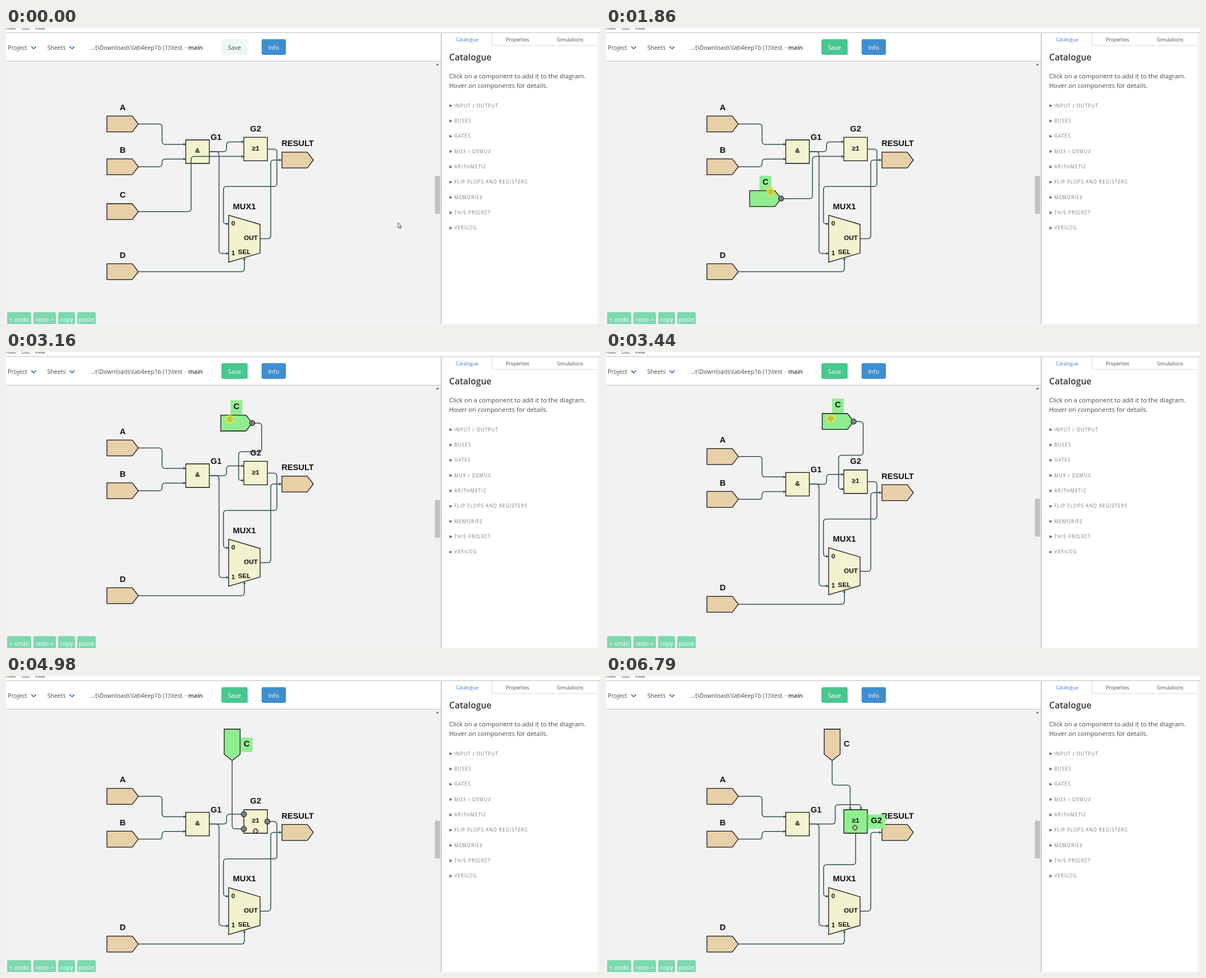
Recreate the animation shown at these times as an HTML page with a canvas. Size 1059 by 529 pixels, loop 8000 ms.

```html
<!DOCTYPE html>
<html lang="en">
<head>
<meta charset="utf-8">
<title>Schematic editor</title>
<style>
html, body { margin: 0; width: 100%; height: 100%; overflow: hidden; background: #fff; }
canvas { display: block; width: 1059px; height: 529px; }
</style>
</head>
<body>
<canvas id="stage" width="1059" height="529"></canvas>
<script>
const ctx = document.getElementById('stage').getContext('2d');
const LOOP = 8000;
const UI = '"Open Sans", "Noto Sans", sans-serif';
const DIAGRAM = '"Liberation Sans", Arial, sans-serif';
const TAN = '#e8d0a9', CREAM = '#f2f2cf', GREEN = '#90ee90';
const WIRE = '#2f4f4f', INK = '#111', GREY = '#4a4a4a';

// Moments of the user's actions
const GRAB = 1460, DROP = 3700, TURN_C = 4110, SELECT_G2 = 5190, TURN_G2 = 5660;
const LAG = 90, GATE = 42, PIN_W = 56, PIN_H = 28.4;

// Pointer moves: start, end, x, y, and the power of the ease-out
const MOVES = [
  [600, 800, 432, 388, 1],
  [1000, 1200, 370, 514, 1],
  [1200, GRAB, 195, 323, 2],
  [GRAB, 1860, 293, 293, 1],
  [1860, 2560, 384, 137, 2],
  [2650, 3350, 400.5, 119, 2],
  [3510, 3680, 390.5, 121, 2],
  [4450, 4960, 445, 277, 2],
  [5020, 5240, 444, 271, 2]
];

const progress = (t, a, b) => Math.min(1, Math.max(0, (t - a) / (b - a)));
const scrollAt = t => 43.6 * progress(t, 3300, DROP);

function pointerAt(t) {
  let x = 699, y = 348;
  for (const [a, b, tx, ty, power] of MOVES) {
    const k = 1 - (1 - progress(t, a, b)) ** power;
    x += (tx - x) * k;
    y += (ty - y) * k;
  }
  return [x, y];
}

// The dragged pin trails the pointer and stops at the top edge
function pinC(t) {
  const [x, y] = pointerAt(Math.min(3770, Math.max(GRAB, t - LAG)));
  return [x - 15, Math.max(109, y - 9)];
}

function rect(x, y, w, h, fill, r = 0) {
  ctx.fillStyle = fill;
  ctx.beginPath();
  ctx.roundRect(x, y, w, h, r);
  ctx.fill();
}

function text(s, x, y, size, color = GREY, align = 'left', weight = 400, family = UI) {
  ctx.font = `${weight} ${size}px ${family}`;
  ctx.fillStyle = color;
  ctx.textAlign = align;
  ctx.fillText(s, x, y);
}

function poly(pts, fill, stroke, width = 1.3) {
  ctx.beginPath();
  pts.forEach(p => ctx.lineTo(...p));
  ctx.closePath();
  ctx.fillStyle = fill;
  ctx.fill();
  if (!stroke) return;
  ctx.strokeStyle = stroke;
  ctx.lineWidth = width;
  ctx.stroke();
}

const bold = (s, x, y, size = 11.8, align = 'center') =>
  text(s, x, y + size * 0.36, size, INK, align, 700, DIAGRAM);

function label(s, x, y, selected) {
  const w = s.length * 10 + 11;
  if (selected) rect(x - w / 2, y - 10.5, w, 25.5, GREEN);
  bold(s, x, y, 14.7);
}

// A pin around its centre, pointing right or down
function pin(x, y, fill = TAN, down = false) {
  const w = PIN_W / 2, h = PIN_H / 2;
  ctx.save();
  ctx.translate(x, y);
  if (down) ctx.rotate(Math.PI / 2);
  poly([[-w, -h], [w - 11, -h], [w, 0], [w - 11, h], [-w, h]], fill, INK);
  ctx.restore();
}

function gate(s, x, y, fill = CREAM) {
  const r = GATE / 2;
  poly([[x - r, y - r], [x + r, y - r], [x + r, y + r], [x - r, y + r]], fill, INK);
  bold(s, x, y - 1.8);
}

function port([x, y]) {
  ctx.beginPath();
  ctx.arc(x, y, 4.7, 0, 7);
  ctx.fillStyle = '#7c7f7c';
  ctx.fill();
  ctx.strokeStyle = '#222';
  ctx.lineWidth = 1.2;
  ctx.stroke();
}

function wire(...pts) {
  const n = pts.length - 1;
  const gap = i => Math.hypot(pts[i + 1][0] - pts[i][0], pts[i + 1][1] - pts[i][1]);
  ctx.beginPath();
  ctx.moveTo(...pts[0]);
  for (let i = 1; i < n; i++)
    ctx.arcTo(...pts[i], ...pts[i + 1], Math.min(5, gap(i - 1) / 2, gap(i) / 2));
  ctx.lineTo(...pts[n]);
  ctx.strokeStyle = WIRE;
  ctx.lineWidth = 1.5;
  ctx.stroke();
  const [x, y] = pts[n], [px, py] = pts[n - 1];
  const dx = Math.sign(x - px) * 4, dy = Math.sign(y - py) * 4;
  poly([[x, y], [x - dx - dy * 0.6, y - dy + dx * 0.6], [x - dx + dy * 0.6, y - dy - dx * 0.6]], WIRE);
}

// From a right side to a left side; loops back when the end is behind the start
function link([x0, y0], [x1, y1]) {
  const mx = (x0 + x1) / 2, my = (y0 + y1) / 2, a = x0 + 17, b = x1 - 9.3;
  if (mx > x0 + 10) wire([x0, y0], [mx, y0], [mx, y1], [x1, y1]);
  else wire([x0, y0], [a, y0], [a, my], [b, my], [b, y1], [x1, y1]);
}

function diagram(t, s) {
  const [cx, cy] = pinC(t);
  const c = t < TURN_C ? [cx + PIN_W / 2, cy + PIN_H / 2] : [403.2, 123];
  const g1 = [341.5, 221 + s], g2 = [445, 216.4 + s], mux = [425, 376.6 + s];
  const cTurned = t >= TURN_C, gTurned = t >= TURN_G2;
  const gSelected = t >= SELECT_G2, cSelected = t >= GRAB && !gSelected;

  const off = ([x, y], dx, dy) => [x + dx, y + dy];
  const side = GATE / 2;
  const g1Out = off(g1, side, 0);
  const g2Out = gTurned ? off(g2, 0, side) : off(g2, side, 0);
  const g2Ins = gTurned ? [off(g2, 9.7, -side), off(g2, -9.7, -side)]
    : [off(g2, -side, -13), off(g2, -side, 13.2)];
  const mux0 = off(mux, -28, -26.5), mux1 = off(mux, -28, 26.3);
  const muxOut = off(mux, 28, 0), muxSel = off(mux, 0, 34);
  const cOut = cTurned ? off(c, 0, PIN_W / 2) : off(c, PIN_W / 2, 0);
  const tip = y => [236, y + s];

  for (const [name, x, y] of [['A', 208, 171.5], ['B', 208, 248], ['D', 208, 435.5], ['RESULT', 520, 236]]) {
    pin(x, y + s);
    label(name, x, y + s - 30);
  }
  gate('&', ...g1);
  label('G1', 374.5, g1[1] - 26.3);
  poly([off(mux, -28, -42), off(mux, 28, -25.5), off(mux, 28, 25.5), off(mux, -28, 42)], CREAM, INK);
  label('MUX1', ...off(mux, 0, -58));
  bold('0', ...off(mux, -20, -27.6));
  bold('1', ...off(mux, -20, 24.8));
  bold('OUT', ...off(mux, 24, -1.6), 11.8, 'right');
  bold('SEL', ...off(mux, 0, 23.4));

  const layers = [
    () => {
      gate('≥1', ...g2, gSelected ? GREEN : CREAM);
      label('G2', ...(gTurned ? off(g2, 37, -2) : off(g2, 0, -37)), gSelected);
    },
    () => {
      pin(...c, cSelected ? GREEN : TAN, cTurned);
      label('C', ...(cTurned ? off(c, 25.8, -2.3) : off(c, 0, -30.3)), cSelected);
    }
  ];
  if (gSelected) layers.reverse();
  layers.forEach(paint => paint());

  link(tip(171.5), off(g1, -side, -13));
  link(tip(248), off(g1, -side, 13.2));
  link(g1Out, mux1);
  link(muxOut, [491, 236 + s]);
  wire(tip(435.5), [muxSel[0], 435.5 + s], muxSel);
  const [inA, inC] = g2Ins;
  if (gTurned) {
    const x = (g1Out[0] + inA[0]) / 2, up = inA[1] - 9, low = (g2Out[1] + mux0[1]) / 2;
    const mid = (cOut[1] + inC[1]) / 2;
    wire(g1Out, [x, g1Out[1]], [x, up], [inA[0], up], inA);
    wire(g2Out, [g2Out[0], low], [388, low], [388, mux0[1]], mux0);
    wire(cOut, [cOut[0], mid], [inC[0], mid], inC);
  } else {
    link(g1Out, inA);
    link(g2Out, mux0);
    if (cTurned) wire(cOut, [cOut[0], inC[1]], inC);
    else link(cOut, inC);
  }

  const [px, py] = pointerAt(t);
  const over = ([x, y], r) => Math.abs(px - x) < r && Math.abs(py - y) < r;
  const onMux = over(mux, 38), onG2 = over(g2, 24);
  if (onMux && t < GRAB) [mux0, mux1, muxOut, muxSel].forEach(port);
  if (t >= GRAB && t < 3910) port(cOut);
  if (onG2 && t > 4500 && (t < 5330 || (t >= 5860 && t < 6790))) [...g2Ins, g2Out].forEach(port);
  return onMux || onG2 || over(c, 26);
}

function plus(x, y, w, len, fill) {
  rect(x - w, y - len, w * 2, len * 2, fill);
  rect(x - len, y - w, len * 2, w * 2, fill);
}

function pointer(t, hovering) {
  ctx.save();
  ctx.translate(...pointerAt(t));
  if (t >= GRAB && t < DROP) {
    rect(-7.7, -7.7, 15.4, 15.4, 'rgba(236,232,50,.85)', 7.7);
    for (let i = 0; i < 4; i++) {
      ctx.rotate(Math.PI / 2);
      poly([[0, -5.5], [2.2, -3.2], [0, -1], [-2.2, -3.2]], '#efe980', '#807a20', 0.9);
    }
  } else if (hovering) {
    plus(0, 0, 2.1, 4.6, '#111');
    plus(0, 0, 1, 3.5, '#fff');
  } else {
    poly([[0, 0], [0, 9.2], [2.1, 7.4], [3.4, 10.4], [4.8, 9.8], [3.5, 6.9], [6.2, 6.6]], '#fff', '#333', 0.9);
  }
  ctx.restore();
}

function chevron(x, y) {
  ctx.beginPath();
  ctx.moveTo(x - 4.3, y - 2.2);
  ctx.lineTo(x, y + 2.2);
  ctx.lineTo(x + 4.3, y - 2.2);
  ctx.strokeStyle = '#3b74c4';
  ctx.lineWidth = 1.8;
  ctx.stroke();
}

function button(s, x, w, fill, color) {
  rect(x, 20, w, 28, fill, 3);
  text(s, x + w / 2, 38.6, 10.7, color, 'center');
}

function header(saved) {
  rect(0, 0, 1059, 60, '#fff');
  [['Sheet', -4], ['Edit', 28], ['View', 51.5]].forEach(([s, x]) => text(s, x, 3.2, 8.3, '#333'));
  rect(0, 7.5, 1059, 1.5, '#cfcfcf');
  rect(0, 58.7, 775, 1.5, '#cfcfcf');
  text('Project', 3, 38.6, 10.7);
  chevron(49.3, 35);
  text('Sheets', 73.5, 38.6, 10.6);
  chevron(117.8, 35);
  text('...t\\Downloads\\lab4eep1b (1)\\test', 150.5, 38.6, 10.55);
  rect(317, 34.6, 6.5, 1, '#c4c4c4');
  text('main', 325, 38.6, 10.5, '#363636', 'left', 600);
  button('Save', 384, 46.8, saved ? '#ebf9f3' : '#48c78e', saved ? GREY : '#fff');
  button('Info', 455.7, 43.3, '#3e8ed0', '#fff');
}

function panel() {
  rect(775, 9, 2, 520, '#cdcdcd');
  rect(777, 9, 282, 520, '#fff');
  rect(1054, 9, 5, 520, '#f3f3f3');
  rect(866, 9, 1, 22, '#dbdbdb');
  rect(866, 31, 188, 1, '#dbdbdb');
  text('Catalogue', 822, 23.6, 8.6, '#3e7fc8', 'center');
  text('Properties', 912, 23.6, 8.6, GREY, 'center');
  text('Simulations', 1005.7, 23.6, 8.6, GREY, 'center');
  text('Catalogue', 790, 57.8, 15.6, '#363636', 'left', 600);
  text('Click on a component to add it to the diagram.', 790, 90.3, 11.3);
  text('Hover on components for details.', 790, 107.2, 11.3);
  ctx.letterSpacing = '1.1px';
  ['INPUT / OUTPUT', 'BUSES', 'GATES', 'MUX / DEMUX', 'ARITHMETIC', 'FLIP FLOPS AND REGISTERS',
    'MEMORIES', 'THIS PROJECT', 'VERILOG'].forEach((s, i) => {
    const y = 138.8 + i * 27.33;
    poly([[790.5, y - 2.8], [796, y], [790.5, y + 2.8]], '#6e6e6e');
    text(s, 799.2, y + 3, 8.2, '#7a7a7a');
  });
  ctx.letterSpacing = '0px';
}

function tools() {
  let x = 2;
  for (const [s, w] of [['< undo', 43], ['redo >', 40], ['copy', 30], ['paste', 33]]) {
    rect(x, 507.7, w, 28, '#7cd7ae', 3);
    text(s, x + w / 2, 525.3, 10.8, '#fff', 'center');
    x += w + 4;
  }
}

function scrollbar(s) {
  rect(764, 60, 11, 469, '#f1f1f1');
  poly([[766.8, 66.6], [769.3, 63.6], [771.8, 66.6]], '#505050');
  rect(764.7, 264.5 - s * 0.137, 9.3, 67.5, '#c1c1c1');
}

function draw(t) {
  const s = scrollAt(t);
  rect(0, 0, 1059, 529, '#f2f2f2');
  const hovering = diagram(t, s);
  tools();
  scrollbar(s);
  header(t < 1500);
  panel();
  pointer(t, hovering);
}

const start = performance.now();
function tick(now) {
  draw(Math.max(0, now - start) % LOOP);
  requestAnimationFrame(tick);
}
draw(0);
requestAnimationFrame(tick);
</script>
</body>
</html>
```
